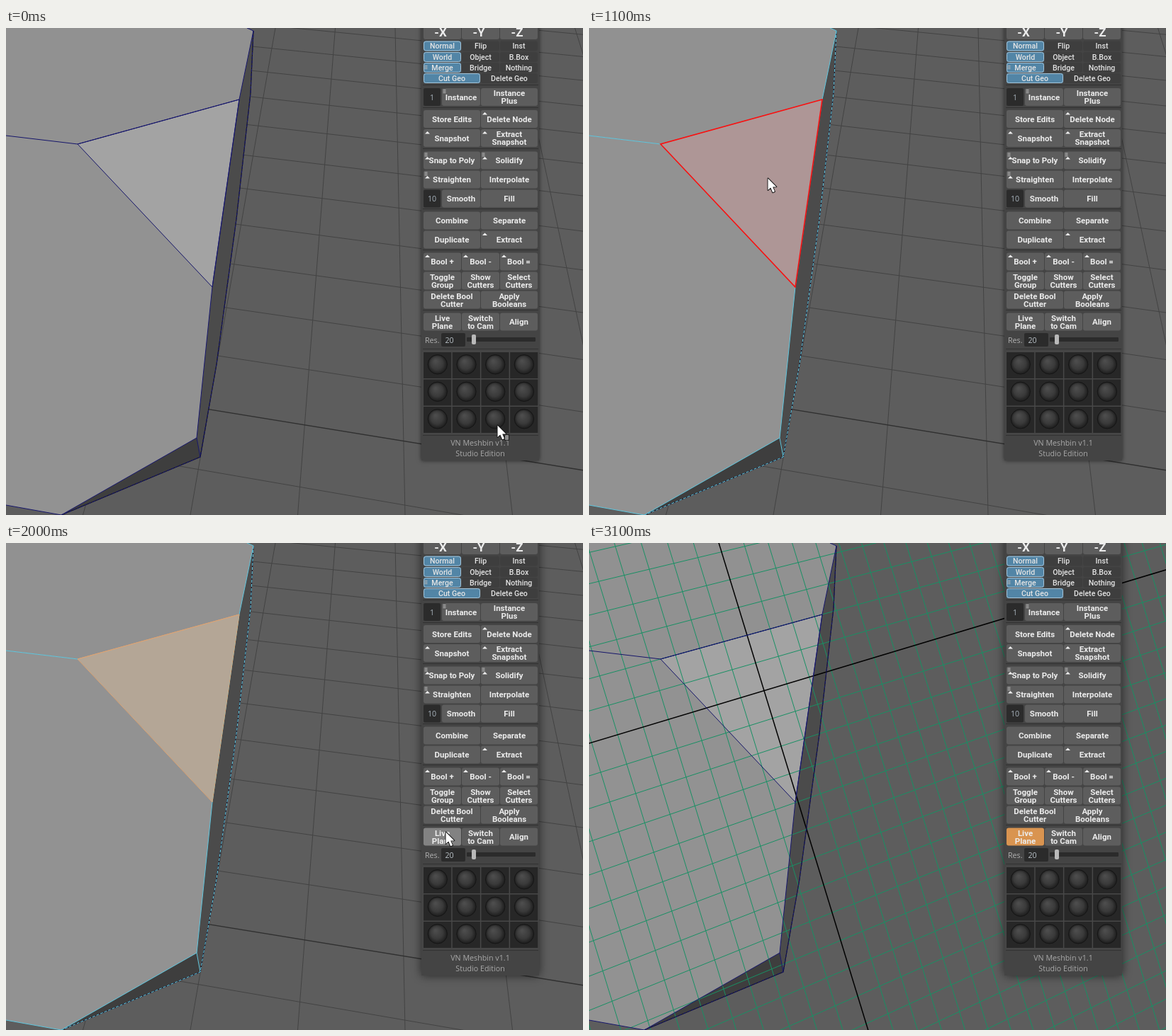
Animation of 814 by 688 pixels, one loop 3700 ms. Source, as an HTML page with a canvas:

```html
<!DOCTYPE html>
<html lang="en">
<head>
<meta charset="utf-8">
<title>Live plane</title>
<style>
html, body { margin: 0; width: 100%; height: 100%; overflow: hidden; background: #5d5d5d; }
canvas { display: block; }
</style>
</head>
<body>
<canvas id="stage" width="814" height="688"></canvas>
<script>
const c = document.getElementById('stage').getContext('2d');
const LOOP = 3700, STEP = 100;
const BOLD = 'bold 11.5px Roboto, sans-serif';
const MEDIUM = '500 10.6px Roboto, sans-serif';
const LIGHT = '10.7px "Open Sans", sans-serif';

// Pointer keys: time, x, y
const keys = [
  [0, 693, 561], [100, 662, 533], [200, 592, 472], [400, 410, 306], [500, 332, 238], [600, 287, 206],
  [700, 281, 238], [800, 274, 262], [1100, 252, 212], [1200, 251, 209], [1300, 251, 209],
  [1400, 384, 260], [1500, 522, 318], [1600, 592, 360], [1700, 633, 387], [1800, 643, 402],
  [1900, 634, 406], [2000, 620, 408], [2500, 620, 408], [2600, 606, 424], [2700, 560, 468],
  [2900, 350, 612], [3000, 251, 672], [3100, 220, 720], [3700, 220, 720]
];

function pointerAt(t) {
  const i = keys.findIndex(k => k[0] > t);
  const [t0, x0, y0] = keys[i - 1], [t1, x1, y1] = keys[i];
  const p = (t - t0) / (t1 - t0);
  return [x0 + (x1 - x0) * p, y0 + (y1 - y0) * p];
}

function trace(points, closed) {
  c.beginPath();
  points.forEach(p => c.lineTo(p[0], p[1]));
  if (closed) c.closePath();
}

function fill(points, color) {
  trace(points, true);
  c.fillStyle = color;
  c.fill();
}

function stroke(points, color, width = 1) {
  trace(points);
  c.strokeStyle = color;
  c.lineWidth = width;
  c.stroke();
}

function box(x, y, w, h, color, r = 0) {
  c.beginPath();
  c.roundRect(x, y, w, h, r);
  c.fillStyle = color;
  c.fill();
}

function text(s, x, y, font, color, align = 'center') {
  c.font = font;
  c.fillStyle = color;
  c.textAlign = align;
  c.fillText(s, x, y);
}

// Model
const A = [101, 164], B = [329, 101], C = [291, 366], D = [269, 579], E = [78, 688], F = [274, 606], T = [349, 4];
const rim = [T, [345, 92], [325, 270], [297, 475], F];

function drawModel() {
  fill([...rim, D, C, B], '#4b4b4b');
  fill([D, F, E], '#3e3e3e');
  fill([[0, 0], [340, 0], T, B, A, [0, 152]], '#919191');
  fill([[0, 152], A, C, D, E, [0, 674]], '#929292');
}

function drawFace(mode) {
  fill([A, B, C], { plain: '#a3a3a3', hover: '#ae9696', picked: '#b4a696' }[mode]);
}

function drawEdges(mode) {
  const color = mode === 'plain' ? '#17176c' : '#5fc6de';
  stroke([...rim, E], '#14142a', 1.2);
  c.setLineDash([4, 2]);
  stroke([...rim, E], color);
  c.setLineDash([]);
  stroke([[340, 0], T, B, C, D, E, [0, 674]], color);
  stroke([[0, 152], A], color);
  stroke([D, F], color);
  const line = { plain: color, hover: '#fa0f0f', picked: '#dba476' }[mode];
  stroke([A, B, C, A, B], line, mode === 'hover' ? 1.6 : 1);
}

// Floor lines meet on a horizon 868 px above the stage
function drawFloor() {
  for (let k = -1; k < 6; k++)
    stroke([[380 + 84.5 * k, 0], [260 + 151.5 * k, 688]], '#434343');
  for (let n = -2; n < 18; n++) {
    const depth = 1 / (7.097e-4 + 0.415e-4 * n), slope = depth / 8644;
    const y = x => depth - 868 + slope * (x - 300);
    stroke([[0, y(0)], [814, y(814)]], n ? '#434343' : '#303030', n ? 1 : 1.4);
  }
}

// Work plane, projected around the centre of the face
function project(u, v) {
  const w = 1 + 0.0094 * u;
  return [(247 + 34.8 * u + 12 * v) / w, (208.6 - 7.82 * u + 39.2 * v) / w];
}

function drawPlane() {
  const green = '#189064';
  for (let i = -20; i <= 40; i++) {
    if (!i) continue;
    stroke([project(i, -20), project(i, 40)], green);
    stroke([project(-20, i), project(40, i)], green);
  }
  stroke([project(0, -20), project(0, 40)], '#000', 1.5);
  stroke([project(-20, 0), project(40, 0)], '#000', 1.5);
}

// Panel
const columns = {
  2: [[589, 80], [670, 80]],
  3: [[589, 53], [643, 53], [697, 53]],
  field: [[589, 24], [615, 54], [670, 80]]
};

// Centre, layout, labels; ^ marks a menu arrow, : a grip, # a number field
const rows = [
  [97.5, 'field', '#1', ':Instance', 'Instance/Plus'],
  [128.5, 2, 'Store Edits', '^Delete Node'],
  [155.5, 2, '^Snapshot', '^Extract/Snapshot'],
  [187, 2, ':^Snap to Poly', ':^Solidify'],
  [214, 2, ':^Straighten', 'Interpolate'],
  [241, 'field', '#10', 'Smooth', 'Fill'],
  [272, 2, 'Combine', 'Separate'],
  [299, 2, 'Duplicate', '^Extract'],
  [330, 3, '^Bool +', '^Bool -', '^Bool ='],
  [357, 3, 'Toggle/Group', 'Show/Cutters', 'Select/Cutters'],
  [384, 2, 'Delete Bool/Cutter', 'Apply/Booleans'],
  [415, 3, 'Live/Plane', 'Switch/to Cam', 'Align']
];
const options = [
  [25.5, 3, 'Normal', 'Flip', 'Inst'],
  [41, 3, 'World', 'Object', 'B.Box'],
  [56, 3, 'Merge', 'Bridge', 'Nothing'],
  [71, 2, 'Cut Geo', 'Delete Geo']
];

function grip(x, y) {
  for (let i = 0; i < 3; i++) box(x, y + 2 * i, 4, 1, '#b5b5b5');
}

function button(x, w, cy, label, pointer, active) {
  const y = cy - 12.5;
  if (label[0] === '#') {
    box(x, y, w, 25, '#2b2b2b', 2);
    return text(label.slice(1), x + w / 2, cy + 4, LIGHT, '#a9b4bd');
  }
  const hot = pointer[0] >= x && pointer[0] < x + w && pointer[1] >= y && pointer[1] < y + 25;
  box(x, y, w, 25, active ? (hot ? '#e29e58' : '#d99450') : hot ? '#828282' : '#5d5d5d', 3);
  const dots = label.includes(':');
  if (dots) grip(x + 1.5, y + 2);
  if (label.includes('^')) {
    const top = y + (dots ? 7.5 : 3);
    fill([[x + 2, top + 3.5], [x + 5.5, top], [x + 9, top + 3.5]], '#f0f0f0');
  }
  const lines = label.replace(/[:^]/g, '').split('/');
  lines.forEach((s, i) =>
    text(s, x + w / 2, cy + 4.1 + 11 * (i - (lines.length - 1) / 2), BOLD, '#ececec'));
}

function sphere(x, y) {
  const g = c.createRadialGradient(x - 3, y - 5, 1, x, y, 14);
  g.addColorStop(0, '#4d4d4d');
  g.addColorStop(0.6, '#3a3a3a');
  g.addColorStop(1, '#1b1b1b');
  c.beginPath();
  c.arc(x, y, 13.7, 0, 7);
  c.fillStyle = g;
  c.fill();
  c.strokeStyle = '#141414';
  c.lineWidth = 0.8;
  c.stroke();
}

function drawPanel(t, pointer) {
  c.save();
  c.shadowColor = 'rgba(0,0,0,.6)';
  c.shadowBlur = t < 2000 ? 6 : 13;
  box(586, -20, 166, 631, '#444');
  c.restore();

  columns[3].forEach(([x, w], i) => {
    box(x, -10, w, 26, '#5d5d5d', 3);
    text('-' + 'XYZ'[i], x + w / 2 - 2.5, 12, 'bold 17px Roboto, sans-serif', '#ececec');
  });
  for (const [cy, layout, ...labels] of options)
    labels.forEach((s, i) => {
      const [x, w] = columns[layout][i];
      box(x, cy - 7, w, 14, i ? '#3e3e3e' : '#5285a6', 3);
      if (!i) {
        c.beginPath();
        c.roundRect(x + 0.5, cy - 6.5, w - 1, 13, 3);
        c.strokeStyle = '#a3c3d8';
        c.lineWidth = 1;
        c.stroke();
      }
      text(s, x + w / 2, cy + 3.8, MEDIUM, '#e4e4e4');
    });
  grip(590.5, 53);

  for (const y of [80, 112, 170, 255, 313, 398, 453, 575]) box(588, y, 163, 1, '#323232');
  for (const [cy, layout, ...labels] of rows)
    labels.forEach((s, i) =>
      button(...columns[layout][i], cy, s, pointer, s === 'Live/Plane' && t >= 2100));

  text('Res.', 591, 444.5, LIGHT, '#b0b0b0', 'left');
  box(614, 431, 34, 19, '#2b2b2b', 2);
  text('20', 625.5, 444.5, LIGHT, '#b8c0c6');
  box(650, 437, 97, 6, '#2b2b2b', 1);
  box(657, 433, 6, 14, '#b9b9b9', 2);

  box(588, 457, 163, 116, '#484848');
  for (let i = 0; i < 12; i++) {
    const x = 589 + 40.7 * (i % 4), y = 458 + 38.5 * Math.floor(i / 4);
    box(x, y, 39.2, 37, '#272727');
    sphere(x + 19.8, y + 17.3);
  }
  text('VN Meshbin v1.1', 669, 590, LIGHT, '#a9a9a9');
  text('Studio Edition', 669, 605, LIGHT, '#a9a9a9');
}

function drawPointer([x, y], badge) {
  c.save();
  c.translate(x, y);
  if (badge) {
    box(10, 13, 7, 9, '#222', 1);
    box(11, 14, 5, 7, '#8c8c8c', 1);
  }
  trace([[0.5, 0.5], [0.5, 17], [4.3, 13.6], [7.2, 20.3], [10, 19.1], [7.2, 12.6], [12.4, 12.4]], true);
  c.lineJoin = 'round';
  c.strokeStyle = '#111';
  c.lineWidth = 1.8;
  c.stroke();
  c.fillStyle = '#fff';
  c.fill();
  c.restore();
}

function draw(now) {
  const t = Math.floor(now % LOOP / STEP) * STEP;
  const pointer = pointerAt(t);
  const live = t >= 2100;
  const mode = t < 1000 || live ? 'plain' : t < 1400 ? 'hover' : 'picked';

  c.fillStyle = '#5d5d5d';
  c.fillRect(0, 0, 814, 688);
  if (!live) drawFloor();
  drawModel();
  drawFace(mode);
  if (live) drawPlane();
  drawEdges(mode);
  drawPanel(t, pointer);
  drawPointer(pointer, t < 200);
}

let start;
function tick(now) {
  start ??= now;
  draw(now - start);
  requestAnimationFrame(tick);
}
requestAnimationFrame(tick);
</script>
</body>
</html>
```
